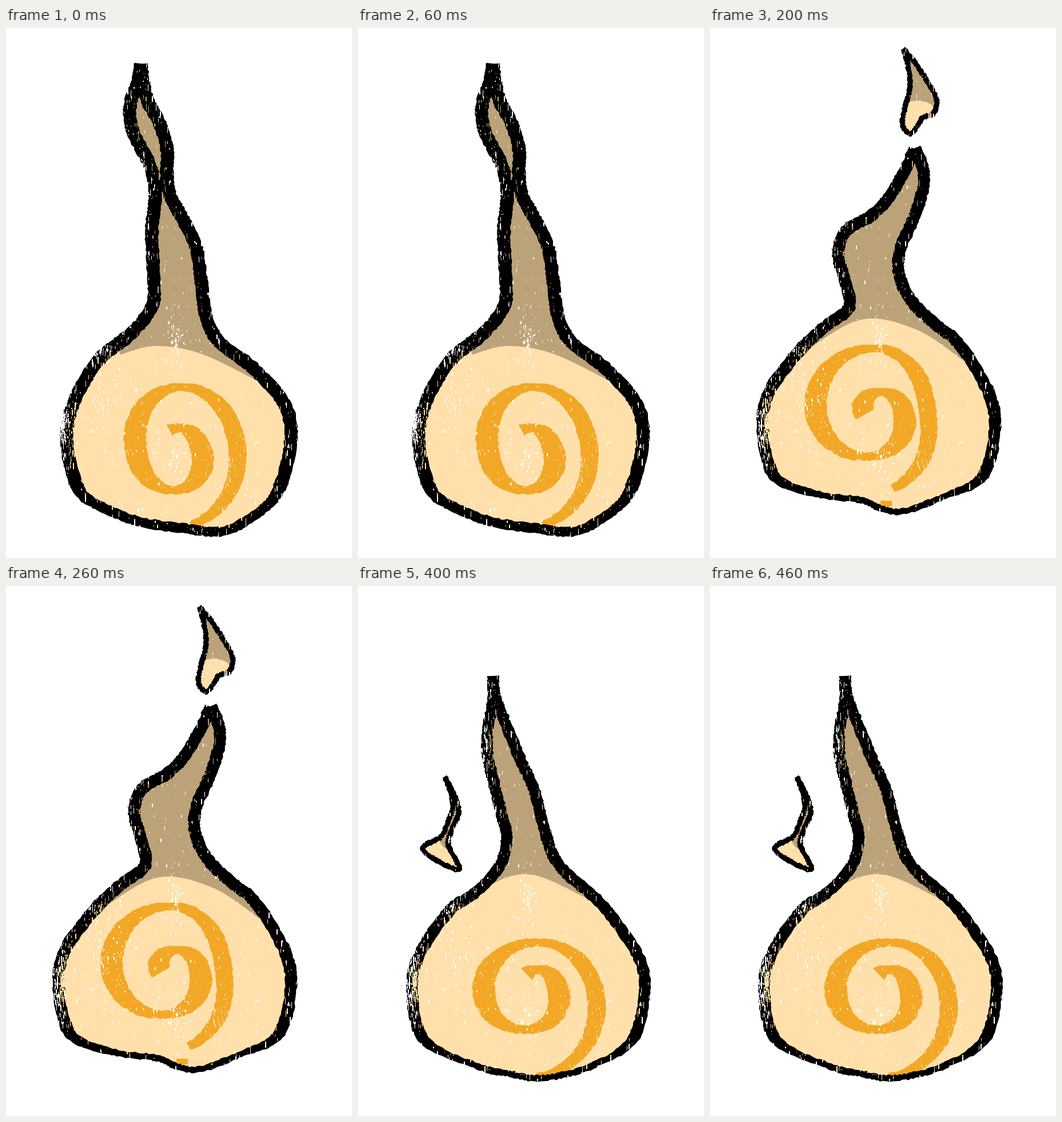
These frames come from a looping animation (605 by 925 pixels, 500 ms). An HTML page with a canvas:

```html
<!DOCTYPE html>
<html lang="en">
<head>
<meta charset="utf-8">
<title>Flickering flame</title>
<style>
html, body { margin: 0; height: 100%; overflow: hidden; background: #fff; }
canvas { display: block; }
</style>
</head>
<body>
<canvas id="stage" width="605" height="925"></canvas>
<script>
const W = 605, H = 925, HOLD = 100;
const INK = '#000', CREAM = '#ffe0ab', TAN = '#bba279', ORANGE = '#f2a826';

let seed = 7;
const random = () => (seed = seed * 16807 % 2147483647) / 2147483647;
const jitter = v => v + random() * 2.4 - 1.2;
const clamp = v => Math.max(0, Math.min(1, v));
const mix = (a, b, t) => a + (b - a) * t;
const parse = text => text.split(' ').map(pair => pair.split(',').map(Number));

// Catmull-Rom value at position u in a list of numbers.
function spline(values, u) {
  const i = Math.min(Math.floor(u), values.length - 2), t = u - i;
  const [a, b, c, d] = [-1, 0, 1, 2].map(k => values[Math.max(0, Math.min(values.length - 1, i + k))]);
  return b + t * (c - a + t * (2 * a - 5 * b + 4 * c - d + t * (3 * (b - c) + d - a))) / 2;
}

function curve(points) {
  const xs = points.map(p => p[0]), ys = points.map(p => p[1]), line = [];
  for (let u = 0; u <= points.length - 1; u += 1 / 16) line.push([spline(xs, u), spline(ys, u)]);
  return line;
}

function polygon(line) {
  const path = new Path2D();
  for (const [x, y] of line) path.lineTo(x, y);
  path.closePath();
  return path;
}

// Ragged brush stroke along a line; width(point, slope, progress) gives its breadth.
function brush(line, width) {
  const near = [], far = [], last = line.length - 1;
  line.forEach(([x, y], i) => {
    const a = line[Math.max(0, i - 1)], b = line[Math.min(last, i + 1)];
    const dx = b[0] - a[0], dy = b[1] - a[1], len = Math.hypot(dx, dy) || 1;
    const half = width([x, y], Math.abs(dy / len), i / last) / 2;
    near.push([jitter(x - dy / len * half), jitter(y + dx / len * half)]);
    far.unshift([jitter(x + dy / len * half), jitter(y - dx / len * half)]);
  });
  return polygon([...near, ...far]);
}

// Bulbous flame: right side down from the tip, round belly, base, left side up to the tip.
function flame({ right, base, left, belly: [cx, cy, rx], pen, sole, ...rest }) {
  const round = (...angles) => angles.map(deg => {
    const part = v => Math.sign(v) * Math.abs(v) ** 0.8, a = deg * Math.PI / 180;
    return [cx + rx * part(Math.cos(a)), cy + 145 * part(Math.sin(a))];
  });
  const tip = parse(right)[0];
  const line = curve([...parse(right), ...round(-22, 0, 30), ...parse(base),
    ...round(150, 180, 202), ...parse(left), tip]);
  return { line, width: ([, y]) => mix(pen, sole, clamp((y - cy - 75) / 40)), ...rest };
}

const spark = (outline, shade) => ({ line: curve(parse(outline)), width: () => 9, shade });

// Spiral from the tail inwards, radii given at each quarter turn, drawn with a broad nib.
function swirl({ at: [cx, cy], radii, from, to }) {
  const line = [];
  for (let k = from; k <= to; k += 0.03) {
    const r = spline(radii, k), a = (1 - k) * Math.PI / 2;
    line.push([cx + r * Math.cos(a), cy + r * Math.sin(a)]);
  }
  return brush(line, (p, slope, t) => (14 + 25 * slope ** 1.5) * mix(0.7, 1, clamp(t * 2.5)));
}

const poses = [
  [flame({
    right: '236,62 240,95 248,128 268,165 282,212 281,250 287,292 306,328 331,378 341,440 350,505 375,550 432,594',
    base: '440,847 380,878 310,873 235,862 172,838',
    left: '160,582 222,530 257,480 257,410 255,350 261,290 252,240 222,180 217,135 230,95',
    belly: [302, 722, 196], pen: 23, sole: 17,
    shade: '200,570 260,555 340,568 440,616',
    swirl: { at: [300, 725], radii: [147, 103, 98, 74, 81, 37, 27, 28], from: 0.1, to: 6.4 }
  })],
  [flame({
    right: '369,174 362,215 354,252 363,295 370,350 364,400 347,450 346,478 375,516 428,552',
    base: '415,827 330,838 240,840 165,814',
    left: '150,556 205,527 262,483 290,448 290,400 295,345 312,300 335,260 358,215',
    belly: [296, 708, 200], pen: 21, sole: 18,
    shade: '200,533 290,521 380,542 465,598',
    swirl: { at: [295, 715], radii: [121, 85, 103, 89, 70, 49, 39, 52], from: 0, to: 6.6 }
  })],
  [flame({
    right: '358,210 371,240 373,278 355,335 333,385 331,430 352,476 395,518 436,552',
    base: '410,817 340,843 300,839 265,824 190,814',
    left: '160,560 203,520 243,488 236,440 224,395 238,354 285,325 320,285 346,238',
    belly: [295, 700, 203], pen: 21, sole: 11,
    shade: '145,580 260,510 360,526 445,582',
    swirl: { at: [292, 665], radii: [146, 88, 106, 107, 81, 45, 29, 24, 22], from: 0.12, to: 7.3 },
    dab: [308, 830]
  }), spark(
    '338,36 358,60 381,95 396,126 390,150 372,157 352,184 337,170 340,142 349,108 348,75 338,36',
    '330,135 350,128 380,130 410,152')],
  [flame({
    right: '217,282 238,320 262,360 310,415 352,463 392,513 440,556',
    base: '440,815 418,845 390,856 320,852 240,838 190,833',
    left: '165,560 203,526 240,499 228,455 228,410 233,360 228,320',
    belly: [298, 705, 202], pen: 21, sole: 10,
    shade: '210,530 268,505 355,535 465,600',
    swirl: { at: [290, 695], radii: [133, 105, 101, 82, 65, 52, 42, 26, 32], from: 0.23, to: 7.7 },
    dab: [310, 839]
  })],
  [flame({
    right: '236,157 239,190 252,225 285,305 306,350 317,390 328,432 342,472 368,505 425,555',
    base: '410,837 350,855 305,859 265,851 215,840',
    left: '160,567 205,535 247,490 260,440 250,395 238,345 226,290 228,245 236,200',
    belly: [298, 710, 203], pen: 20, sole: 11,
    shade: '180,565 245,515 310,505 400,545',
    swirl: { at: [310, 710], radii: [146, 105, 88, 90, 62, 41, 40, 20], from: 0, to: 6.3 }
  }), spark(
    '152,333 168,365 176,395 164,425 158,452 178,494 145,483 113,458 145,437 160,405 166,378 152,333',
    '140,440 150,456 165,462 185,462')]
];

// Vertical scratches of the woodcut: scattered ones, plus worn patches [x, y, rx, ry, count].
function scratches(count, length, ...patches) {
  const path = new Path2D();
  const add = (x, y) => path.rect(Math.round(x), Math.round(y),
    random() < 0.75 ? 1 : 2, 1 + Math.floor(random() ** 2 * length));
  while (count--) add(random() * W, random() * H);
  for (const [x, y, rx, ry, n] of patches) {
    for (let i = 0; i < n; i++) {
      const a = random() * 2 * Math.PI, r = random();
      add(x + rx * r * Math.cos(a), y + ry * r * Math.sin(a));
    }
  }
  return path;
}

const inkWear = scratches(3400, 12, [98, 690, 30, 90, 380], [165, 560, 70, 60, 160], [225, 270, 40, 220, 260]);
const paperWear = scratches(1500, 6, [296, 545, 14, 65, 90], [170, 660, 70, 110, 180], [295, 745, 40, 80, 100]);
const strokeWear = scratches(600, 8, [385, 770, 45, 75, 160]);

function layer(draw) {
  const canvas = document.createElement('canvas');
  canvas.width = W;
  canvas.height = H;
  draw(canvas.getContext('2d'));
  return canvas;
}

function paint(g, path, color) {
  g.fillStyle = color;
  g.fill(path);
}

function wear(g, path) {
  g.globalCompositeOperation = 'destination-out';
  g.fill(path);
}

function drawBlob(g, blob) {
  g.drawImage(layer(c => {
    paint(c, polygon(blob.line), CREAM);
    c.globalCompositeOperation = 'source-atop';
    paint(c, polygon([...curve(parse(blob.shade)), [W, 0], [0, 0]]), TAN);
    c.drawImage(layer(o => {
      if (blob.swirl) paint(o, swirl(blob.swirl), ORANGE);
      if (blob.dab) o.fillRect(blob.dab[0] - 10, blob.dab[1] - 5, 20, 10);
      wear(o, strokeWear);
    }), 0, 0);
    wear(c, paperWear);
  }), 0, 0);
  g.drawImage(layer(c => {
    paint(c, brush(blob.line, blob.width), INK);
    wear(c, inkWear);
  }), 0, 0);
}

const pictures = poses.map(pose => layer(g => pose.forEach(blob => drawBlob(g, blob))));
const stage = document.getElementById('stage').getContext('2d');

function tick() {
  const index = Math.floor(performance.now() / HOLD) % pictures.length;
  stage.clearRect(0, 0, W, H);
  stage.drawImage(pictures[index], 0, 0);
  requestAnimationFrame(tick);
}
tick();
</script>
</body>
</html>
```
